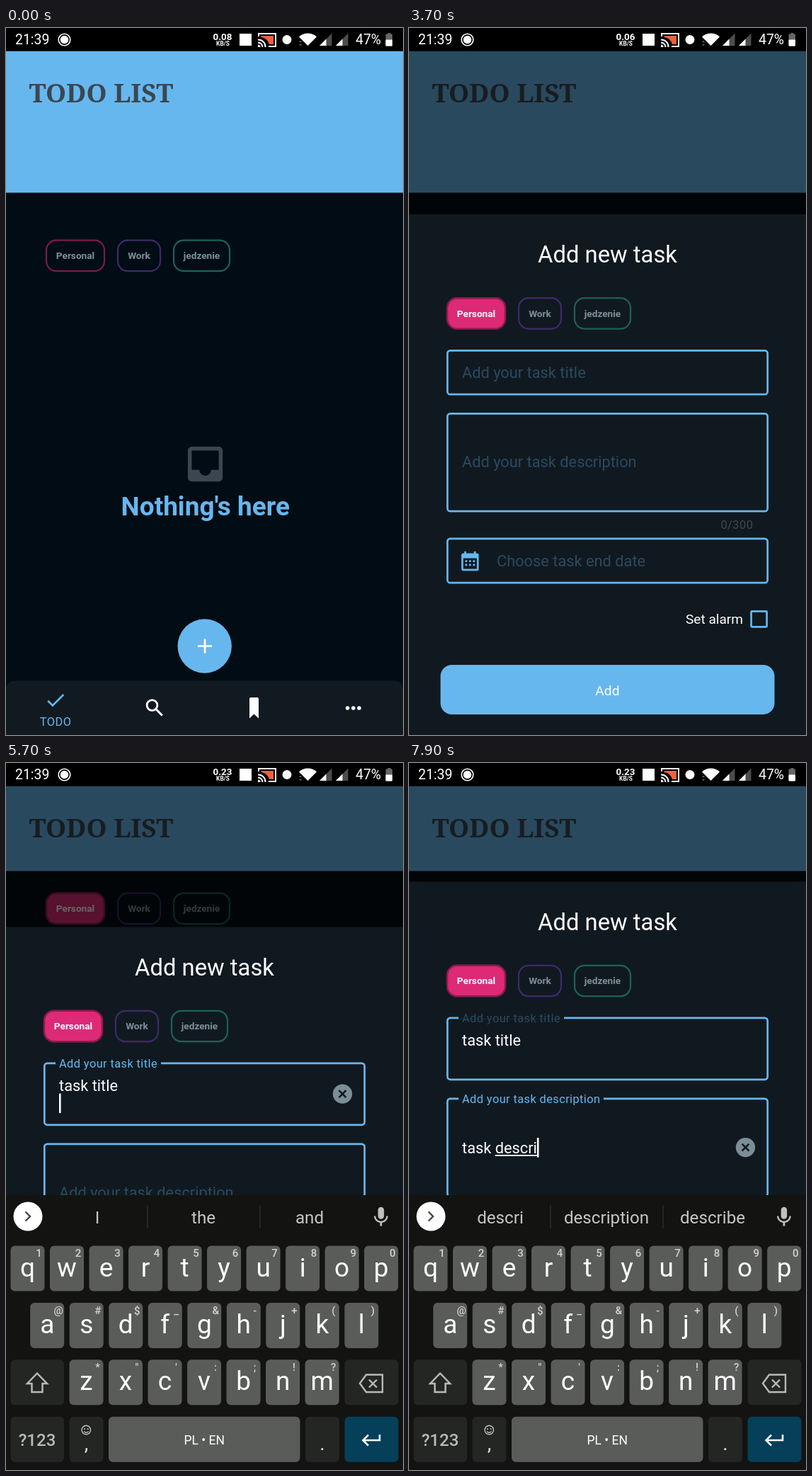
Recreate the animation shown at these times as an HTML page. Size 561 by 998 pixels, loop 8 s.

```html
<!DOCTYPE html>
<html lang="en">
<head>
<meta charset="utf-8">
<title>Todo list</title>
<style>
html, body { margin: 0; width: 100%; height: 100%; overflow: hidden; background: #000; }
svg { display: block; width: 100vw; height: 100vh; font-family: Roboto, sans-serif; }
text { white-space: pre; }
</style>
</head>
<body>
<svg id="stage" viewBox="0 0 561 998"></svg>
<script>
const BLUE = '#67b7ef', DIM = '#294a5f', SHEET = '#111920', KEYS = '#131411';
const SCALE = 1.365;
const stage = document.getElementById('stage');

// Markup helpers
const rect = (x, y, w, h, r, fill, more = '') =>
  `<rect x="${x}" y="${y}" width="${w}" height="${h}" rx="${r}" fill="${fill}" ${more}/>`;
const circle = (x, y, r, fill, more = '') =>
  `<circle cx="${x}" cy="${y}" r="${r}" fill="${fill}" ${more}/>`;
const text = (x, y, size, fill, str, more = '') =>
  `<text x="${x}" y="${y}" font-size="${size}" fill="${fill}" ${more}>${str}</text>`;
const line = (d, color, width, more = '') =>
  `<path d="${d}" fill="none" stroke="${color}" stroke-width="${width}" ${more}/>`;
const icon = (x, y, fill, d, scale = SCALE) =>
  `<path transform="translate(${x} ${y}) scale(${scale})" fill="${fill}" d="${d}"/>`;
const group = (id, body) => `<g id="${id}">${body}</g>`;
const MID = 'text-anchor="middle"';
const BOLD = 'font-weight="700"';

function chip(x, w, label, color) {
  return rect(x + 1, 299.7, w - 2, 43.4, 14, 'none', `stroke="${color}" stroke-width="2.2"`) +
    text(x + w / 2, 326.4, 13.65, '#7d9098', label, `${MID} ${BOLD}`);
}

function chips(id) {
  const chosen = rect(57, 299.7, 82, 43.4, 14, '#dc2a77', 'stroke="#8f1a4d" stroke-width="2.4"') +
    text(98, 326.4, 13.65, '#fff', 'Personal', `${MID} ${BOLD}`);
  return chip(56, 84, 'Personal', '#7d1a48') + group(id, chosen) +
    chip(157, 62, 'Work', '#3e2a6b') + chip(236, 81, 'jedzenie', '#1a6356');
}

function statusBar() {
  const signal = (x, part) =>
    `<path d="M${x} 25h17.5v-17.5z" fill="#4d4d4d"/><path d="M${x} 25h${part}v-${part}z" fill="#fff"/>`;
  return rect(0, 0, 561, 32.7, 0, '#000') +
    text(13, 23, 19.4, '#fff', '21:39') +
    circle(82.5, 16.5, 8.3, 'none', 'stroke="#fff" stroke-width="1.6"') + circle(82.5, 16.5, 5.8, '#fff') +
    text(306, 16.5, 13.4, '#fff', '0.08', `id="speed" ${MID} ${BOLD}`) +
    text(306.5, 25.3, 8.3, '#fff', 'KB/S', `${MID} ${BOLD}`) +
    rect(330, 8, 17, 17, 0, '#fff') +
    line('M357 12V8H381V26H371', '#fff', 2) +
    '<path d="M360.500 11H378V23H372A14 14 0 0 0 360.500 13Z" fill="#f0603c"/>' +
    line('M356 16.500A10 10 0 0 1 366.500 27M356 20.500A6.500 6.500 0 0 1 362.500 27', '#fff', 2) +
    '<path d="M356 23.500A3.500 3.500 0 0 1 359.500 27H356Z" fill="#fff"/>' +
    circle(397, 16.5, 6.5, '#fff') +
    '<path d="M426.500 25L414 12.500A18 18 0 0 1 439 12.500Z" fill="#fff"/>' +
    '<path d="M414 20l2-2 2 2zM414 23l2 2 2-2z" fill="#777"/>' +
    signal(443, 9.5) + signal(466, 9.5) +
    text(494, 23, 19.4, '#fff', '47%') +
    rect(539.5, 7, 4, 3, 0, '#666') + rect(536.5, 8.5, 9.5, 17, 1, '#666') + rect(536.5, 16.5, 9.5, 9, 1, '#fff');
}

function home() {
  const nav = '<path d="M0 998V935Q0 921.500 14 921.500H547Q561 921.500 561 935V998Z" fill="#111a20"/>' +
    icon(53.6, 932.4, BLUE, 'M9 16.170L4.830 12l-1.420 1.410L9 19 21 7l-1.410-1.410z') +
    text(70.2, 985, 16.4, BLUE, 'TODO', `${MID} letter-spacing=".45"`) +
    line('M211.500 961L220.800 970.500', '#fff', 3) +
    circle(206.5, 956, 7.4, 'none', 'stroke="#fff" stroke-width="2.8"') +
    '<path d="M344 947q0-2 2-2h9q2 0 2 2v27.500l-6.500-6-6.500 6z" fill="#fff"/>' +
    [482.6, 490.8, 499].map(x => circle(x, 960, 2.8, '#fff')).join('');
  return rect(0, 32, 561, 966, 0, '#020c14') +
    rect(0, 32, 561, 200.5, 0, BLUE, 'id="header"') +
    text(32.5, 104.5, 37, '#3b4750', 'TODO LIST', `font-family="Noto Serif, serif" ${BOLD}`) +
    group('homeChips', chips('homePick')) +
    icon(248.8, 582.8, '#3b4650', 'M19 3H5C3.900 3 3 3.900 3 5V19C3 20.100 3.900 21 5 21H19' +
      'C20.100 21 21 20.100 21 19V5C21 3.900 20.100 3 19 3zM19 15h-4c0 1.660-1.350 3-3 3s-3-1.340-3-3H5V5H19z', 2.73) +
    text(281.8, 688, 37, BLUE, 'Nothing\'s here', `${MID} ${BOLD}`) +
    circle(280.7, 872.5, 38.2, BLUE) + line('M271 872.500h20M281 862.500v20', '#fff', 2.7) + nav;
}

const box = (y, h, id = '') =>
  rect(54.3, y + 1.3, 452.4, h - 2.6, 4, 'none', `stroke="${BLUE}" stroke-width="2.700" id="${id}"`);
const clearIcon = (id, y) => group(id, circle(475.5, y, 13.7, '#7b8e97') +
  line(`M470.500 ${y - 5}l10 10m0-10l-10 10`, SHEET, 2.6));
const entry = (id, y) =>
  rect(74.5, y - 21.5, 0, 29.5, 0, '#1e6a5b', `id="${id}Mark"`) +
  text(75, y, 21.8, '#fff', '', `id="${id}Text"`) +
  rect(75, y + 2.5, 0, 1.8, 0, '#fff', `id="${id}Line"`) +
  rect(75, y - 21, 2.6, 27.5, 0, '#fff', `id="${id}Caret"`);

// Sheet coordinates start at its top edge
function sheet() {
  const lower =
    box(280, 140.5) + rect(70, 278, 205, 5, 0, SHEET, 'id="descGap"') +
    text(75, 357, 21.8, DIM, 'Add your task description', 'id="descLabel"') + entry('desc', 358) +
    clearIcon('descClear', 350) +
    text(486.5, 444, 16.4, '#40474d', '0/300', 'text-anchor="end" letter-spacing=".5"') +
    box(456.5, 65) +
    icon(69.9, 474.5, BLUE, 'M9 10V12H7V10H9M13 10V12H11V10H13M17 10V12H15V10H17M19 3A2 2 0 0 1 21 5V19' +
      'A2 2 0 0 1 19 21H5C3.890 21 3 20.100 3 19V5A2 2 0 0 1 5 3H6V1H8V3H16V1H18V3H19M19 19V8H5V19H19' +
      'M9 14V16H7V14H9M13 14V16H11V14H13M17 14V16H15V14H17Z') +
    text(124, 496.5, 21.8, DIM, 'Choose task end date') +
    text(391, 578, 19.1, '#fff', 'Set alarm') +
    rect(483.6, 560.3, 22, 22, 1, 'none', `stroke="${BLUE}" stroke-width="2.700"`) +
    rect(44.5, 636, 472, 70, 16, BLUE) + text(280.5, 678.5, 19.1, '#fff', 'Add', `${MID} letter-spacing=".2"`);
  return rect(0, 0, 561, 1000, 0, SHEET) +
    text(280.5, 68.3, 32.8, '#fff', 'Add new task', MID) +
    `<g transform="translate(-3 -181.500)">${chips('sheetPick')}</g>` +
    box(191, 64.5, 'titleBox') + rect(70, 189, 149, 5, 0, SHEET, 'id="titleGap"') +
    text(75, 230.5, 21.8, DIM, 'Add your task title', 'id="titleLabel"') + entry('title', 231) +
    clearIcon('titleClear', 223) + group('lower', lower);
}

function keyboard() {
  const LIGHT = '#5a5c5a', DARK = '#242623', INK = '#b9bab7';
  const key = (x, y, w, fill) => rect(x, y, w, 64, 6, fill);
  const row = (x, y, letters, hints) => [...letters].map((c, i) => {
    const left = x + i * 55.52;
    const hint = hints[i] === '&' ? '&amp;' : hints[i];
    return key(left, y, 48, LIGHT) + text(left + 24, y + 43, 37, '#fff', c, MID) +
      text(left + 40, y + 15.5, 15, '#d4d4d2', hint, `${MID} font-weight="500"`);
  }).join('');
  return rect(0, 610, 561, 388, 0, KEYS) +
    circle(31, 640, 20.5, '#fff') + line('M27.500 633.500l6.500 6.500-6.500 6.500', '#444', 2.4) +
    [129, 279, 429].map((x, i) => text(x, 649.5, 24.2, '#c6c7c4', '', `id="word${i}" ${MID}`)).join('') +
    line('M200 624v33M359 624v33', '#2d2e2b', 1.5) +
    icon(513, 624, '#c0c1be', 'M12 14c1.660 0 3-1.340 3-3V5c0-1.660-1.340-3-3-3S9 3.340 9 5v6c0 1.660 1.340 3 3 3z' +
      'm5.300-3c0 3-2.540 5.100-5.300 5.100S6.700 14 6.700 11H5c0 3.410 2.720 6.230 6 6.720V21h2v-3.280' +
      'c3.280-.480 6-3.300 6-6.720z', 1.41) +
    row(6.5, 681.5, 'qwertyuiop', '1234567890') +
    row(34.2, 762, 'asdfghjkl', '@#$_&-+()') +
    row(89.5, 842.3, 'zxcvbnm', '*"\':;!?') +
    key(6.5, 842.3, 75.5, DARK) + line('M44 861.500L58 876H51.500V888H36.500V876H30Z', INK, 2.5) +
    key(478.5, 842.3, 76, DARK) + line('M509 863.500H532V888H509L500 875.800ZM513 870.500l11 11m0-11l-11 11', INK, 2.4) +
    key(6.5, 922.7, 75.5, DARK) + text(44, 964, 24, INK, '?123', `${MID} font-weight="500"`) +
    key(89.5, 922.7, 48, DARK) + text(113.5, 970, 28, '#ddd', ',', MID) +
    circle(113.3, 941.5, 6.2, 'none', 'stroke="#c4c4c2" stroke-width="1.400"') +
    circle(111, 940, 1, '#c4c4c2') + circle(115.6, 940, 1, '#c4c4c2') +
    line('M110 943.500q3.300 3.500 6.600 0', '#c4c4c2', 1.3) +
    key(145, 922.7, 270.5, LIGHT) + text(280.3, 961.5, 17.5, '#fff', 'PL • EN', MID) +
    key(423, 922.7, 48, DARK) + text(447, 970, 28, '#ddd', '.', MID) +
    key(478.5, 922.7, 76, '#053f59') + line('M528 948V956H505M512 948.500L504.500 956L512 963.500', '#fff', 2.6);
}

stage.innerHTML = group('home', home()) + rect(0, 32, 561, 966, 0, '#000', 'id="scrim"') +
  group('sheet', sheet()) + group('keyboard', keyboard()) + statusBar();

const el = {};
stage.querySelectorAll('[id]').forEach(n => { el[n.id] = n; });
const set = (id, attrs) => { for (const k in attrs) el[id].setAttribute(k, attrs[k]); };
const show = (id, on) => set(id, { opacity: +on });
const shift = (id, y) => set(id, { transform: `translate(0 ${y})` });

// Timing helpers
const ramp = (t, a, b) => Math.min(1, Math.max(0, (t - a) / (b - a)));
const easeOut = p => 1 - (1 - p) ** 3;
const inOut = p => p < 0.5 ? 2 * p * p : 1 - 2 * (1 - p) ** 2;
const mix = (a, b, p) => a + (b - a) * p;
const typed = (str, t, start, step) => str.slice(0, Math.max(0, Math.floor((t - start) / step) + 1));

const FOCUS = 3790, NEWLINE = 5700, SWITCH = 6440;
const SUGGESTIONS = [
  [0, 'I', 'the', 'and'],
  [4130, 'ta', 'task', 'to'],
  [4530, 'and', 'force', 'for'],
  [4900, 'ti', 'title', 'time'],
  [5700, 'I', 'the', 'and'],
  [7000, 'ta', 'task', 'to'],
  [7360, 'and', 'force', 'for'],
  [7440, 'de', 'description', 'des'],
  [7690, 'descri', 'description', 'describe']
];

function floatLabel(id, p, from, to, color) {
  set(id, { y: mix(from, to, p), 'font-size': mix(21.8, 16.4, p), 'letter-spacing': p > 0 ? 0.4 : 0, fill: color });
}

function fillEntry(id, str, composing) {
  const node = el[id + 'Text'];
  if (node.textContent !== str) node.textContent = str;
  const width = str ? node.getComputedTextLength() : 0;
  const start = str.lastIndexOf(' ') + 1;
  const before = start ? node.getSubStringLength(0, start) : 0;
  set(id + 'Line', { x: 75 + before, width: composing ? width - before : 0 });
  set(id + 'Caret', { x: 75 + width });
  return width;
}

function draw(t) {
  const open = easeOut(ramp(t, 3830, 4030)), close = ramp(t, 5900, 6100) ** 2;
  const reopen = easeOut(ramp(t, 6600, 6800));
  const keys = open - close + reopen;
  const resized = keys > 0.5, tall = t >= NEWLINE;
  const onTitle = t >= FOCUS && t < SWITCH, onDesc = t >= SWITCH;

  el.speed.textContent = t < 3200 ? '0.08' : t < 5200 ? '0.06' : '0.23';
  set('homePick', { opacity: ramp(t, 1450, 1600) });
  set('header', { height: resized ? 120.5 : 200.5 });
  shift('homeChips', resized ? -116 : 0);
  set('scrim', { opacity: 0.6 * ramp(t, 2400, 2650) });

  const slide = easeOut(ramp(t, 2443, 2943));
  shift('sheet', 263 + 735 * (1 - slide) - 6.4 * open - (tall ? 25 : 0) - 64 * reopen);
  shift('keyboard', 388 * (1 - keys));
  shift('lower', tall ? 25 : 0);

  // Title field
  const title = typed('task ', t, 4130, 100) + typed('title', t, 4900, 120);
  const titleWidth = fillEntry('title', title, !tall && title && !title.endsWith(' '));
  set('titleBox', { height: tall ? 86.9 : 61.9 });
  floatLabel('titleLabel', inOut(ramp(t, FOCUS, 3960)), 230.5, 198, onTitle ? BLUE : DIM);
  show('titleGap', t >= FOCUS);
  set('titleMark', { width: t >= 4530 && t < 4800 ? titleWidth : 0 });
  show('titleCaret', onTitle);
  if (tall) set('titleCaret', { x: 75 });
  set('titleCaret', { y: tall ? 235 : 210 });
  shift('titleClear', tall ? 12.5 : 0);
  set('titleClear', { opacity: title ? 1 - ramp(t, 6430, 6520) : 0 });

  // Description field
  const desc = typed('task ', t, 7000, 90) + typed('descri', t, 7440, 85);
  fillEntry('desc', desc, desc && !desc.endsWith(' '));
  floatLabel('descLabel', inOut(ramp(t, SWITCH, 6640)), 357, 287, onDesc ? BLUE : DIM);
  show('descGap', onDesc);
  show('descCaret', onDesc);
  set('descCaret', desc ? { y: 336.5, height: 27.5 } : { y: 335, height: 30 });
  show('descClear', desc.length > 0);

  const words = SUGGESTIONS.filter(s => t >= s[0]).pop();
  for (let i = 0; i < 3; i++) el['word' + i].textContent = words[i + 1];
}

function tick() {
  draw(performance.now() % 8000);
  requestAnimationFrame(tick);
}
tick();
</script>
</body>
</html>
```
